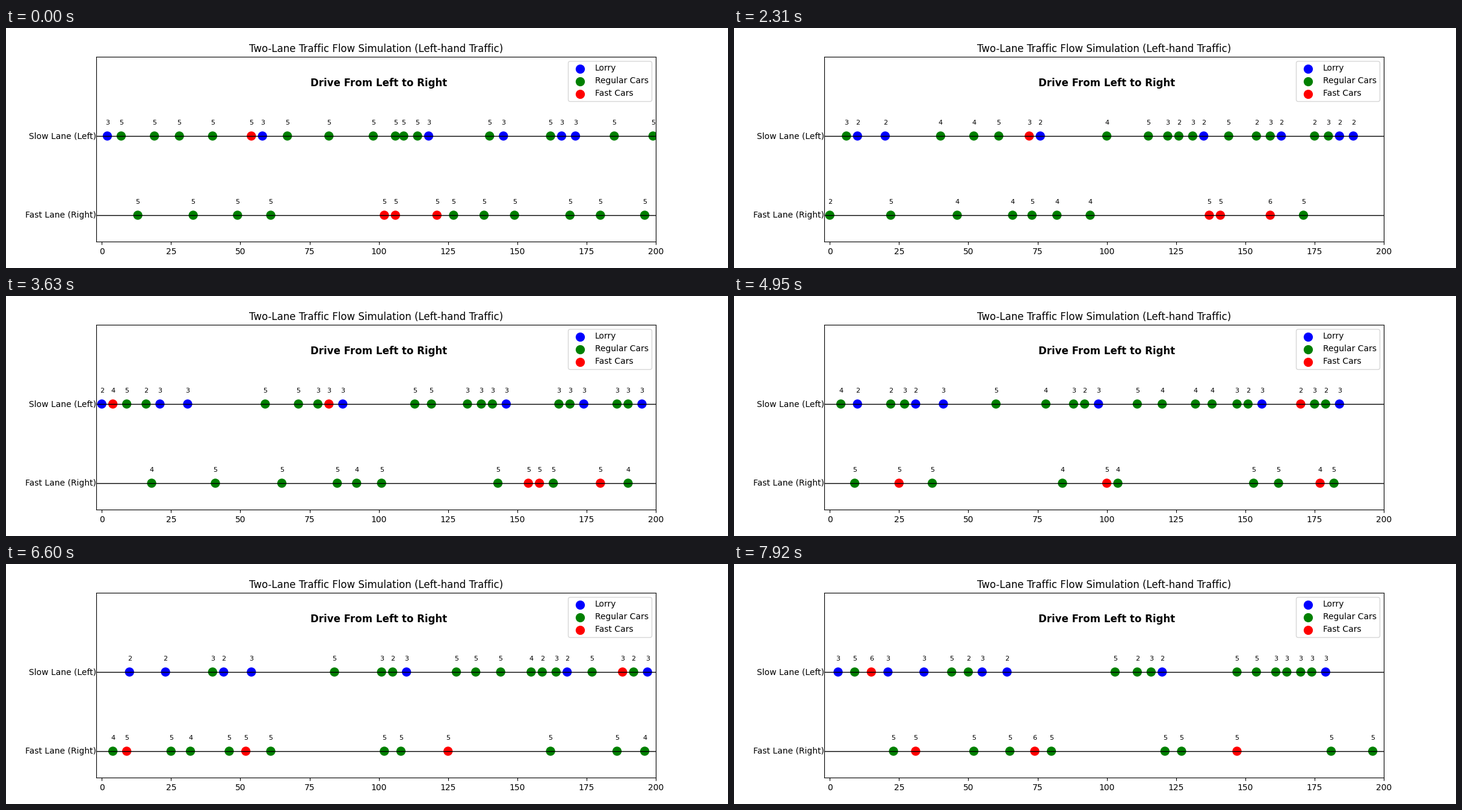
A matplotlib script that plays this animation: 1200 by 400 pixels, repeating every 8000 ms.

```python
import math

import matplotlib.pyplot as plt
from matplotlib.animation import FuncAnimation

LOOP, INTERVAL, STEP = 8000, 40, 330   # milliseconds
STEPS = math.ceil(LOOP / STEP)
ROAD = 200
GAP = 4.5             # least distance kept to the car ahead
ENTRY_SPEED, GAIN = 2, 2
LANE_Y = {"slow": 1.5, "fast": 0}
OTHER = {"slow": "fast", "fast": "slow"}

LORRY, REGULAR, FAST = "Lorry", "Regular Cars", "Fast Cars"
COLOR = {LORRY: "blue", REGULAR: "green", FAST: "red"}
PACE = {LORRY: 2.6, REGULAR: 4.75, FAST: 5.4}

# Each car is its place at the start, or (place, steps of its lane changes...).
STARTS = {
    (LORRY, "slow"): [2, 58, 118, 145, 166, 171],
    (FAST, "slow"): [(54, 13)],
    (FAST, "fast"): [(102, 13), 106, 121],
    (REGULAR, "slow"): [(7, 18), 19, 28, (40, 5, 13), (67, 18), 82, (98, 13, 18, 22),
                        (106, 9), 109, (114, 2, 5, 9), (140, 18), 162, 185, 199],
    (REGULAR, "fast"): [13, (33, 18), (49, 13), (61, 9), (127, 2), 138, (149, 2),
                        169, 180, 196],
}

# Later cars: the step of entry, or (step, steps of its lane changes...).
ENTRIES = {
    (LORRY, "slow"): [3, 11, 16, 23],
    (FAST, "slow"): [(10, 13), 21],
    (FAST, "fast"): [18],
    (REGULAR, "slow"): [(2, 5, 13), (5, 18), 9, (14, 18, 22), 22],
    (REGULAR, "fast"): [7, 13, 19],
}


class Car:
    def __init__(self, kind, lane, turns, pos, speed, enter=0):
        self.kind, self.lane, self.turns = kind, lane, turns
        self.pos, self.speed, self.enter = pos, speed, enter
        self.shown_speed = round(speed)

    def move(self, ahead):
        """Speed up to the car's pace, but keep the gap to the car ahead."""
        self.speed = min(self.speed + GAIN, PACE[self.kind],
                         max(1, ahead - GAP - self.pos))
        old = round(self.pos)
        self.pos += self.speed
        self.shown_speed = round(self.pos) - old


def rows(groups):
    for (kind, lane), cars in groups.items():
        for car in cars:
            first, *turns = car if isinstance(car, tuple) else (car,)
            yield kind, lane, turns, first


def simulate():
    """Return (kind, lane, position, speed) of all cars on the road, by step."""
    cars = [Car(kind, lane, turns, pos, PACE[kind])
            for kind, lane, turns, pos in rows(STARTS)]
    waiting = [Car(kind, lane, turns, 0, ENTRY_SPEED, enter)
               for kind, lane, turns, enter in rows(ENTRIES)]
    history = []
    for step in range(STEPS):
        if step:
            ahead = dict.fromkeys(LANE_Y, math.inf)
            for car in sorted(cars, key=lambda c: -c.pos):
                if step in car.turns:
                    car.lane = OTHER[car.lane]
                car.move(ahead[car.lane])
                ahead[car.lane] = car.pos
        cars += [c for c in waiting if c.enter == step]
        cars = [c for c in cars if round(c.pos) < ROAD]
        history.append([(c.kind, c.lane, round(c.pos), c.shown_speed) for c in cars])
    return history


traffic = simulate()

fig, ax = plt.subplots(figsize=(12, 4), dpi=100)
ax.set_xlim(-2, ROAD)
ax.set_ylim(-0.5, 3)
ax.set_yticks([])
ax.set_title("Two-Lane Traffic Flow Simulation (Left-hand Traffic)")
ax.text(100, 2.5, "Drive From Left to Right", fontsize=12, weight="bold",
        ha="center", va="center")
for lane, name in (("slow", "Slow Lane (Left)"), ("fast", "Fast Lane (Right)")):
    ax.axhline(LANE_Y[lane], color="black", lw=1)
    ax.text(-2, LANE_Y[lane], name, ha="right", va="center")

for kind, color in COLOR.items():
    ax.scatter([], [], s=100, color=color, label=kind)
ax.legend(loc="upper right")
dots = ax.scatter([], [], s=100)
labels = [ax.text(0, 0, "", fontsize=8, ha="center", va="center")
          for _ in range(max(map(len, traffic)))]


def update(frame):
    # The step in force at the end of this frame's interval.
    cars = traffic[(frame * INTERVAL + INTERVAL - 1) // STEP]
    dots.set_offsets([(pos, LANE_Y[lane]) for _, lane, pos, _ in cars])
    dots.set_color([COLOR[kind] for kind, *_ in cars])
    for label in labels:
        label.set_text("")
    for label, (_, lane, pos, speed) in zip(labels, cars):
        label.set_position((pos, LANE_Y[lane] + 0.25))
        label.set_text(str(speed))
    return [dots, *labels]


anim = FuncAnimation(fig, update, frames=LOOP // INTERVAL, interval=INTERVAL,
                     repeat=True, repeat_delay=0)
plt.show()
```
